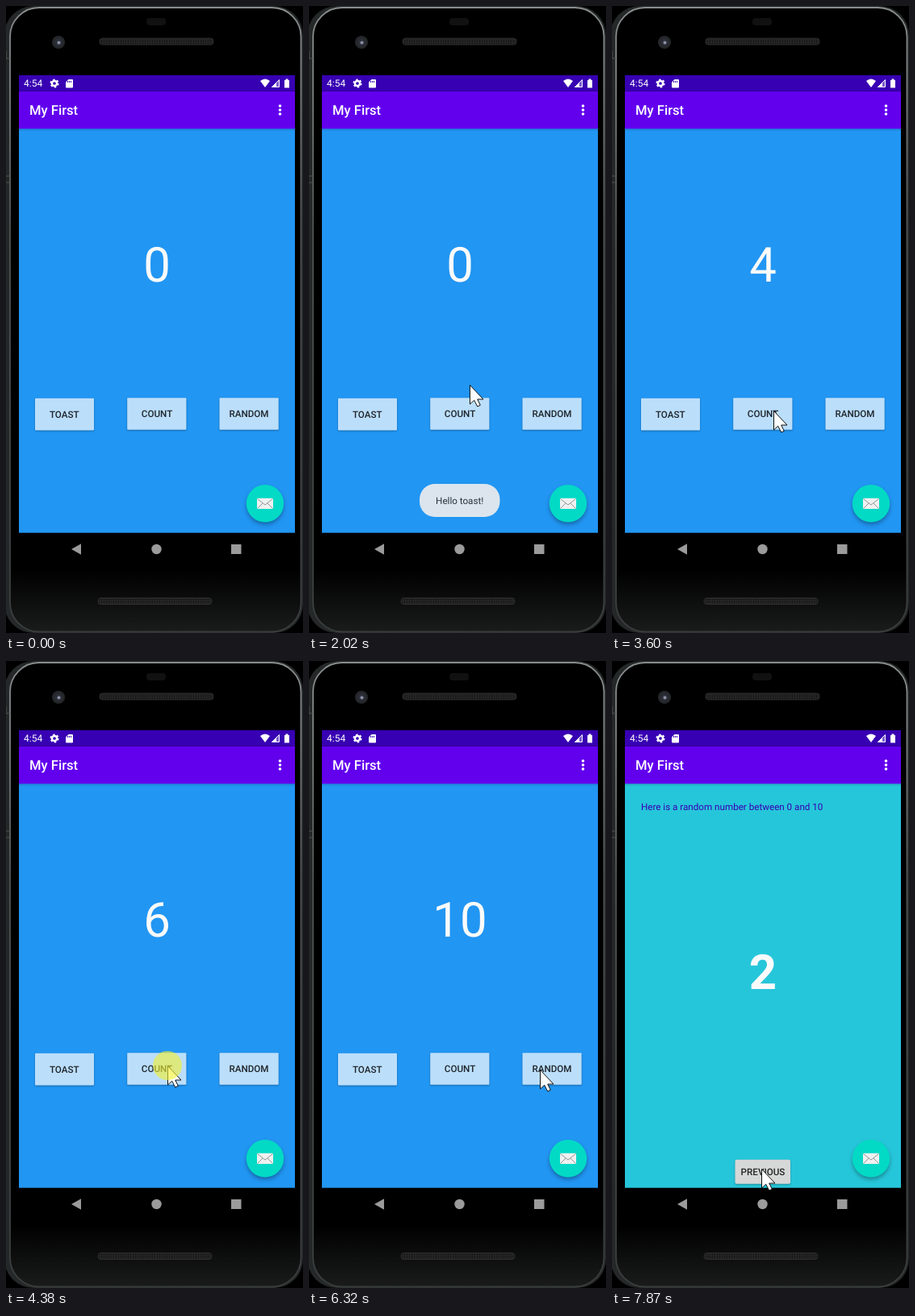
Write an HTML page that moves like this. It is 368 by 778 pixels and loops after 8000 ms.

```html
<!DOCTYPE html>
<html lang="en">
<head>
<meta charset="utf-8">
<title>Counter app</title>
<style>
html, body { margin: 0; width: 100%; height: 100%; overflow: hidden; background: #000; }
svg { display: block; width: 368px; height: 778px; font: 11.65px Roboto, sans-serif; text-rendering: geometricPrecision; }
.mid { text-anchor: middle; }
.label { font-weight: 500; fill: #000; fill-opacity: .84; text-anchor: middle; }
.big { font-size: 59.9px; fill: #fafafa; text-anchor: middle; }
.btn { filter: drop-shadow(0 1px 1px rgba(0,0,0,.3)); }
</style>
</head>
<body>
<svg viewBox="0 0 368 778">
  <defs>
    <linearGradient id="edge" x2="0" y2="1">
      <stop offset="0" stop-color="#8a8d8d"/>
      <stop offset=".12" stop-color="#7d8282"/>
      <stop offset=".35" stop-color="#505454"/>
      <stop offset="1" stop-color="#3a3d3d"/>
    </linearGradient>
    <linearGradient id="body" x2="0" y2="1">
      <stop offset=".9" stop-color="#000"/>
      <stop offset="1" stop-color="#1a1b1b"/>
    </linearGradient>
    <linearGradient id="shade" x2="0" y2="1">
      <stop offset="0" stop-opacity=".14"/>
      <stop offset="1" stop-opacity="0"/>
    </linearGradient>
    <pattern id="mesh" width="3" height="3" patternUnits="userSpaceOnUse">
      <rect width="3" height="3" fill="#272727"/>
      <circle cx="1.5" cy="1.5" r=".9" fill="#111"/>
    </pattern>
  </defs>

  <!-- phone body -->
  <rect width="368" height="778" fill="#000"/>
  <rect x="-2" y="0" width="370" height="778" rx="36" fill="#252828"/>
  <rect x="5" y="2" width="360.5" height="774.5" rx="36" fill="url(#body)" stroke="url(#edge)" stroke-width="1.8"/>
  <path d="M0 56v9h5M0 211h5M0 219h5" fill="none" stroke="#555" stroke-width="1.2"/>
  <rect x="174" y="15" width="24" height="9" rx="4" fill="#111"/>
  <rect x="116" y="40" width="141" height="8" rx="3.5" fill="url(#mesh)" stroke="#2c2c2c"/>
  <rect x="114" y="734.5" width="141" height="8" rx="3.5" fill="url(#mesh)" stroke="#2c2c2c"/>
  <circle cx="65" cy="45" r="8" fill="#25272a"/>
  <circle cx="65" cy="45" r="4.8" fill="#2c2f38"/>
  <circle cx="65.5" cy="45.5" r="2" fill="#8a90a4"/>

  <!-- screen -->
  <rect id="page" x="16" y="152" width="342" height="501.7"/>
  <rect x="16" y="152.3" width="342" height="3.5" fill="url(#shade)"/>
  <rect x="16" y="105.7" width="342" height="46.6" fill="#6200ee"/>
  <rect x="16" y="85.8" width="342" height="19.9" fill="#3700b3"/>
  <g fill="#fff">
    <text x="22" y="100.3" font-size="12">4:54</text>
    <circle cx="60" cy="96" r="3.1" fill="none" stroke="#fff" stroke-width="2.5"/>
    <circle cx="60" cy="96" r="4.7" fill="none" stroke="#fff" stroke-width="1.7" stroke-dasharray="2.5 2.42"/>
    <path d="M77.5 91H82q1 0 1 1v8.5q0 1-1 1H75q-1 0-1-1V94.5z"/>
    <path d="M76.5 93v2M78.5 93v2M80.5 93v2" stroke="#3700b3"/>
    <path d="M315 93Q321 88 327 93L321 101z"/>
    <path d="M329.5 100.5L338.5 91.5V100.5z" fill-opacity=".35" stroke="#fff"/>
    <path d="M329 101L335 95V101z"/>
    <path d="M345 92h1.5v-1.5h3V92H351v9.5h-6z"/>
    <text x="29" y="135.3" font-size="16.64" font-weight="500">My First</text>
    <circle cx="339.5" cy="124" r="1.8"/>
    <circle cx="339.5" cy="129" r="1.8"/>
    <circle cx="339.5" cy="134" r="1.8"/>
  </g>

  <g id="first">
    <text id="count" class="big" x="187" y="341.8"></text>
    <g fill="#bbdefb">
      <rect class="btn" x="36" y="486.7" width="73" height="39.8" rx="1"/>
      <rect class="btn" x="150.2" y="486.2" width="73.2" height="39.6" rx="1"/>
      <rect class="btn" x="264.5" y="486.2" width="73.2" height="39.6" rx="1"/>
    </g>
    <text class="label" x="72.3" y="510.6">TOAST</text>
    <text class="label" x="187" y="510.3">COUNT</text>
    <text class="label" x="301" y="510.3">RANDOM</text>
  </g>

  <g id="second">
    <text x="36" y="185" fill="#3700b3">Here is a random number between 0 and 10</text>
    <text class="big" x="187" y="406.6" font-weight="700">2</text>
    <rect class="btn" x="152.5" y="618.7" width="68.5" height="30" rx="2" fill="#d6d7d7"/>
    <text class="label" x="187" y="638">PREVIOUS</text>
  </g>

  <circle cx="321" cy="617.3" r="23.2" fill="#03dac5" style="filter:drop-shadow(0 3px 2.5px rgba(0,0,0,.3))"/>
  <rect x="311" y="610.8" width="20" height="13.2" rx="1" fill="#f0f0f0"/>
  <path d="M311.5 611.5L321 619L330.5 611.5M311.5 623.5L318 617M330.5 623.5L324 617" fill="none" stroke="#8d9999"/>

  <g id="toast">
    <rect x="137" y="593" width="99.5" height="41" rx="19" fill="#dce5ed"/>
    <text class="mid" x="186.7" y="618" fill="#27333d">Hello toast!</text>
  </g>

  <g fill="#9b9b9b">
    <path d="M81 674L93 667.2V680.8z"/>
    <circle cx="186.5" cy="674" r="6.2"/>
    <rect x="279" y="668" width="12.5" height="12"/>
  </g>

  <g id="mouse">
    <path d="M.5 .5V24L5.7 19.2L9.7 27L13.3 25.3L9.7 18H17z" fill="#fff" stroke="#111" stroke-linejoin="round"/>
    <circle id="press" r="18" fill="#f0f032" fill-opacity=".62"/>
  </g>
</svg>

<script>
const LOOP = 8000;
const $ = id => document.getElementById(id);

// start, end, steps, then a quadratic path: from, control, to
const moves = [
  [70, 690, 9, [218, 682], [170, 560], [72, 515]],
  [1095, 1560, 7, [72, 515], [110, 430], [196, 420]],
  [1790, 2170, 6, [196, 420], [198, 433], [200, 502]],
  [5540, 6090, 8, [200, 502], [255, 527], [286, 507]],
  [7250, 7870, 9, [286, 507], [265, 585], [185, 630]]
];

// mouse button down, up
const clicks = [
  [940, 1095],
  [2430, 2660], [2820, 2980], [3130, 3290], [3440, 3600], [3750, 3920],
  [4070, 4220], [4380, 4530], [4610, 4760], [4930, 5080], [5230, 5390],
  [6240, 6320]
];
const counts = clicks.slice(1, -1).map(c => c[1]);
const SWITCH = 6470;

const clamp = v => Math.max(0, Math.min(1, v));
const show = (id, on) => $(id).style.display = on ? "" : "none";

function mouseAt(t) {
  const [start, end, steps, a, b, c] = moves.findLast(m => t >= m[0]);
  const k = Math.floor(clamp((t - start) / (end - start)) * (steps - 1));
  const p = (k + 1) / steps;
  const e = p * p * (3 - 2 * p), q = 1 - e;
  return a.map((v, i) => q * q * v + 2 * e * q * b[i] + e * e * c[i]);
}

function draw(now) {
  const t = (now + 4) % LOOP;
  const second = t >= SWITCH;
  show("first", !second);
  show("second", second);
  $("page").setAttribute("fill", second ? "#26c6da" : "#2196f3");
  $("count").textContent = counts.filter(c => t >= c).length;
  $("toast").style.opacity = clamp((t - 1095) / 300) * clamp((3440 - t) / 350);
  show("mouse", t >= 70);
  show("press", clicks.some(([down, up]) => t >= down && t < up));
  if (t >= 70) $("mouse").setAttribute("transform", `translate(${mouseAt(t)})`);
  requestAnimationFrame(() => draw(performance.now() - begin));
}

const begin = performance.now();
draw(0);
</script>
</body>
</html>
```
